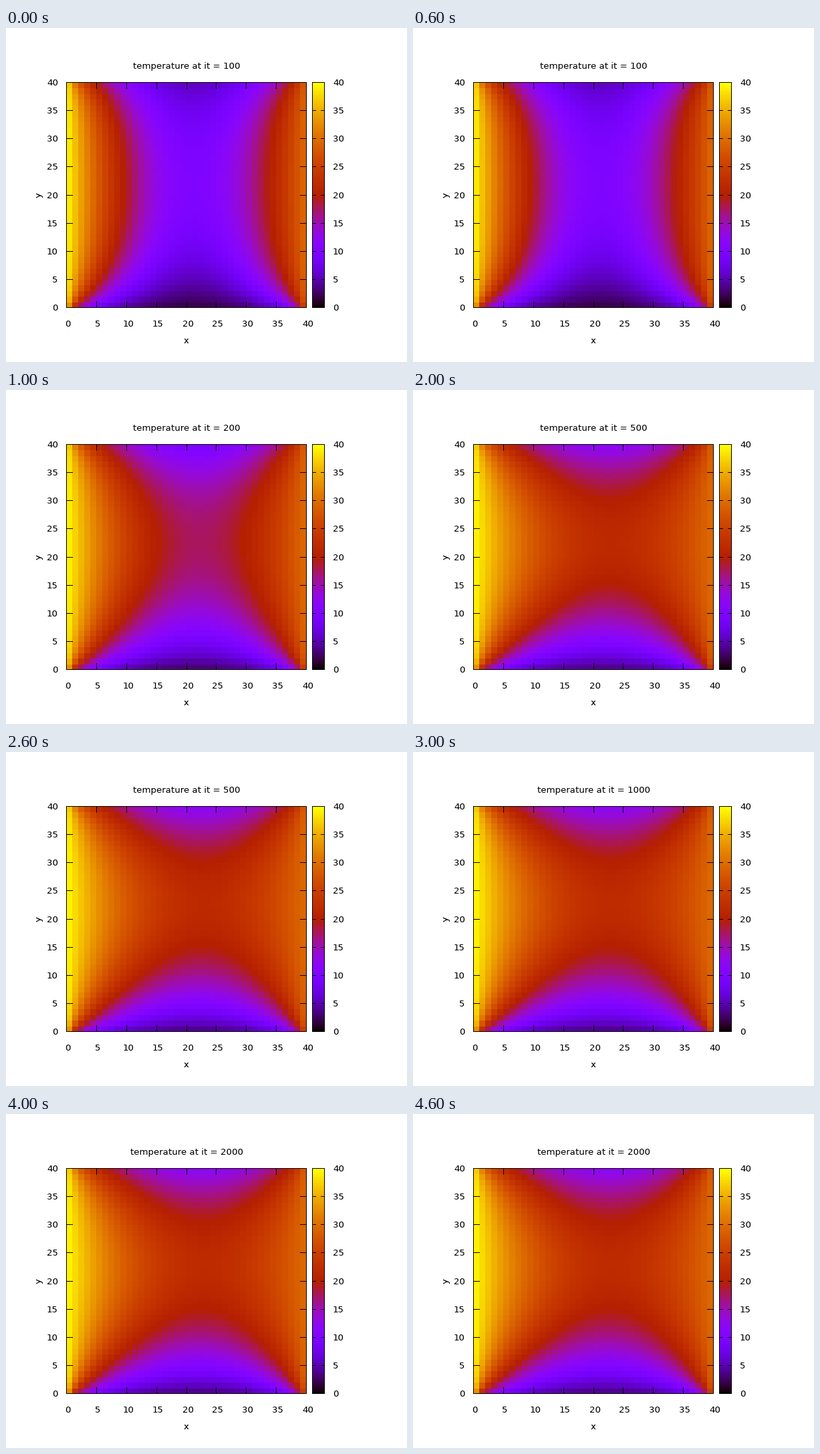
Animation of 600 by 500 pixels, one loop 5 s. Source, as a matplotlib script:

```python
import numpy as np
import matplotlib.pyplot as plt
from matplotlib.animation import FuncAnimation

W, H = 600, 500
N = 40                               # cells per side
T_LEFT, T_RIGHT, T_MAX = 40, 30, 40
H_BOTTOM, H_TOP = 0.5, 0.1           # heat loss through the horizontal edges
STEPS = [100, 200, 500, 1000, 2000]
X0, X1, Y0, Y1 = 90, 449, 418, 81    # plot box in pixels
CB0, CB1 = 458, 476                  # colour bar edges

plt.rcParams["font.family"] = "DejaVu Sans"
plt.rcParams["font.size"] = 9.6
plt.rcParams["text.hinting"] = "native"


def second_diff(n):
    return 2 * np.eye(n) - np.eye(n, k=1) - np.eye(n, k=-1)


# Implicit heat equation, solved in the eigenmodes of each direction
kx = second_diff(N - 1)
ky = second_diff(N + 1)
ky[0, 1] = ky[-1, -2] = -2
ky[0, 0] += 2 * H_BOTTOM
ky[-1, -1] += 2 * H_TOP
lam_x, vec_x = np.linalg.eigh(kx)
lam_y, vec_y = np.linalg.eig(ky)
lam_y, vec_y = lam_y.real, vec_y.real
source = np.zeros((N + 1, N - 1))
source[:, 0] = T_LEFT
source[:, -1] = T_RIGHT
rate = lam_y[:, None] + lam_x[None, :]
steady = np.linalg.solve(vec_y, source) @ vec_x / rate


def temperature(step):
    t = np.empty((N + 1, N + 1))
    t[:, 0], t[:, -1] = T_LEFT, T_RIGHT
    t[:, 1:-1] = vec_y @ (steady * (1 - (1 + rate) ** -float(step))) @ vec_x.T
    return t


def palette(v):
    v = np.clip(v, 0, 1)
    return np.stack([np.sqrt(v), v ** 3,
                     np.clip(np.sin(2 * np.pi * v), 0, 1)], axis=-1)


def cell_colors(step):
    t = temperature(step)
    mean = (t[1:, 1:] + t[1:, :-1] + t[:-1, 1:] + t[:-1, :-1]) / 4
    return palette(mean / T_MAX)


fig = plt.figure(figsize=(W / 100, H / 100), dpi=100, facecolor="white")
ax = fig.add_axes([0, 0, 1, 1])
ax.axis("off")


def mesh(rgb, left, right):
    rows, cols = rgb.shape[:2]
    xs = np.round(np.linspace(left, right, cols + 1))
    ys = np.round(np.linspace(Y0, Y1, rows + 1)) + 1
    return ax.pcolormesh(xs, ys, rgb, antialiased=False, zorder=1)


def line(xs, ys):
    ax.plot(np.add(xs, .5), np.add(ys, .5), color="black", lw=.72, snap=False,
            antialiased=False, solid_capstyle="projecting",
            solid_joinstyle="miter", zorder=3)


def box(left, right):
    line([left, right, right, left, left], [Y0, Y0, Y1, Y1, Y0])


def label(x, y, s, ha="center", va="baseline", **kw):
    return ax.text(x, y, s, ha=ha, va=va, color="black", **kw)


heat = mesh(cell_colors(STEPS[0]), X0, X1)
mesh(palette(np.linspace(0, 1, 128))[:, None, :], CB0, CB1)

for v in range(0, N + 1, 5):
    x = round(X0 + (X1 - X0) * v / N)
    y = round(Y0 + (Y1 - Y0) * v / N)
    if 0 < v < N:
        line([x, x], [Y0, Y0 - 9])
        line([x, x], [Y1, Y1 + 9])
        line([X0, X0 + 9], [y, y])
        line([X1, X1 - 9], [y, y])
        line([CB0, CB0 + 5], [y, y])
        line([CB1, CB1 - 5], [y, y])
    label(x + 2.5, 447, str(v))
    label(78, y + 5, str(v), ha="right")
    label(489, y + 5, str(v), ha="left")

box(X0, X1)
box(CB0, CB1)
label(270, 472, "x")
label(49, 250, "y", rotation=90, va="center")
title = label(270.5, 61, "")

ax.set_xlim(0, W)
ax.set_ylim(H, 0)


def update(i):
    step = STEPS[i % len(STEPS)]
    heat.set_array(cell_colors(step))
    title.set_text(f"temperature at it = {step}")
    return heat, title


anim = FuncAnimation(fig, update, frames=len(STEPS), interval=1000,
                     repeat=True, repeat_delay=0)
plt.show()
```
